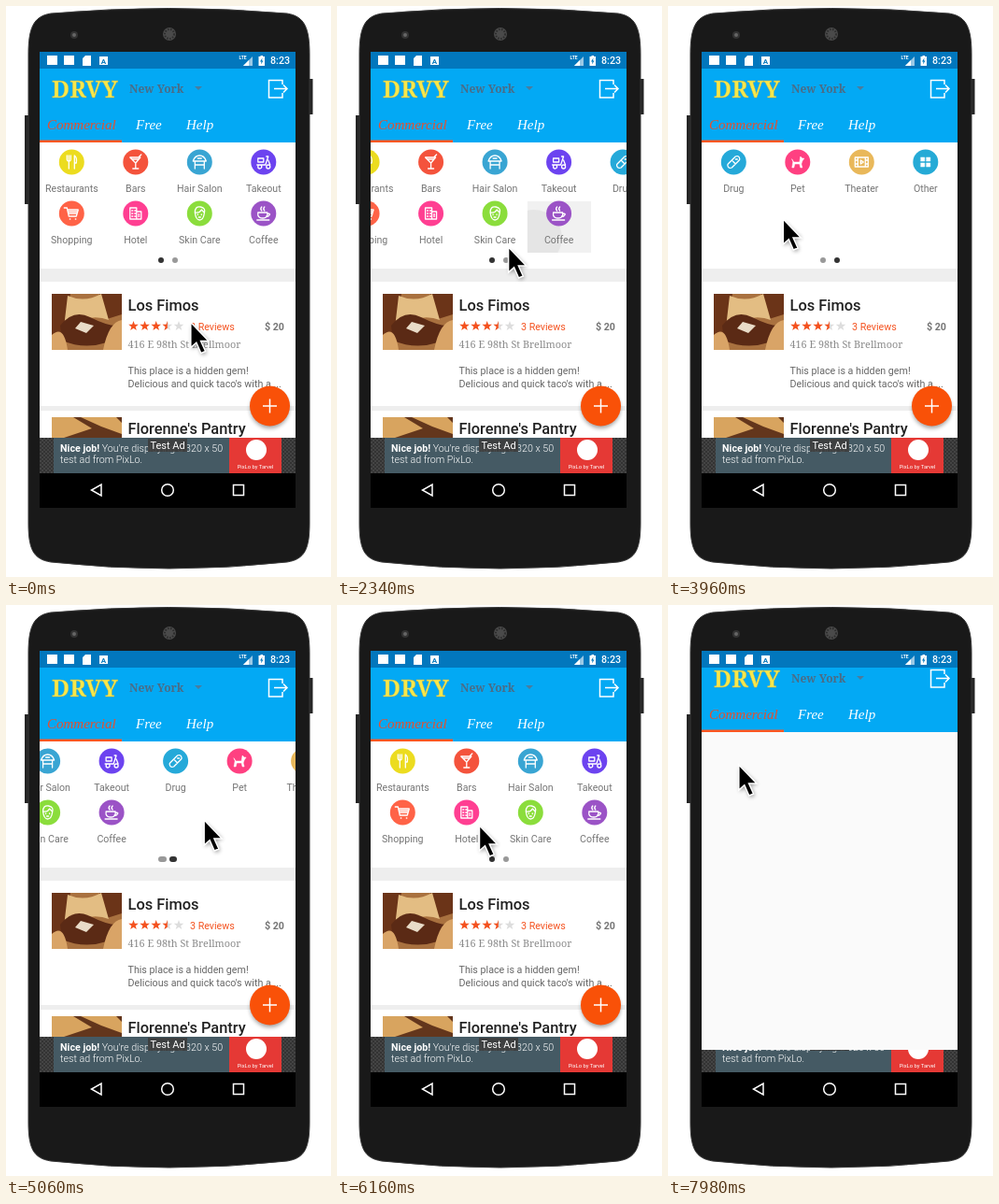
An HTML page that plays this animation: 348 by 611 pixels, repeating every 8000 ms.

```html
<!DOCTYPE html>
<html lang="en">
<head>
<meta charset="utf-8">
<title>Directory app</title>
<style>
html, body { margin: 0; width: 100%; height: 100%; overflow: hidden; background: #fff; }
svg { display: block; width: 100vw; height: 100vh; font-family: Roboto, sans-serif; }
.serif { font-family: "Noto Serif", serif; }
.tab { font: italic 15px "Liberation Serif", serif; fill: #fff; }
.label { font-size: 10.6px; fill: #757575; text-anchor: middle; }
.icon { fill: none; stroke: #fff; stroke-width: 1.3; stroke-linecap: round; stroke-linejoin: round; }
.line { fill: none; stroke: #fff; stroke-width: 1.5; }
.dot { stroke-width: 6; stroke-linecap: round; }
</style>
</head>
<body>
<svg viewBox="0 0 348 611">
  <defs>
    <clipPath id="screen"><rect x="36" y="49" width="274" height="488"/></clipPath>
    <clipPath id="body"><rect x="36" y="67" width="274" height="433"/></clipPath>
    <clipPath id="cell"><rect id="cellBox" width="68.5" height="55"/></clipPath>
    <clipPath id="reveal"><rect id="revealBox"/></clipPath>
    <clipPath id="photo1"><rect x="49" y="308" width="75" height="60"/></clipPath>
    <clipPath id="photo2"><rect x="49" y="440" width="75" height="30"/></clipPath>
    <pattern id="mesh" width="4" height="4" patternUnits="userSpaceOnUse">
      <path d="M0 0H4V4H0Z" fill="#444"/><path d="M0 0H2V2H0ZM2 2H4V4H2Z" fill="#333"/>
    </pattern>
    <filter id="soft" x="-50%" y="-50%" width="200%" height="200%"><feGaussianBlur stdDeviation="2"/></filter>
  </defs>

  <!-- phone -->
  <path d="M22 117V212M326.500 78V116" stroke="#252525" stroke-width="4"/>
  <path d="M24 52C24 24 29 11 48 8Q175-3 301 8C320 11 325 24 325 52V553C325 581 320 592 301 595Q175 609 48 595C29 592 24 581 24 553Z" fill="#191919" stroke="#383838"/>
  <circle cx="73" cy="31" r="4" fill="#333"/><circle cx="73" cy="31" r="2" fill="#666"/>
  <circle cx="175" cy="30" r="7" fill="#4a4a4a"/>
  <circle cx="175" cy="30" r="5" fill="none" stroke="#2c2c2c" stroke-width="2" stroke-dasharray="1.500 1.500"/>

  <g clip-path="url(#screen)">
    <rect x="36" y="49" width="274" height="488" fill="#eee"/>
    <path d="M36 146H310V281H36ZM36 295H310V428H36ZM36 433H310V500H36Z" fill="#fff"/>

    <!-- category pager -->
    <g id="pager">
      <g id="ripple" clip-path="url(#cell)">
        <rect id="rippleBg" width="68.5" height="55" fill="#000" opacity=".055"/>
        <circle id="rippleDot" fill="#000" opacity=".05"/>
      </g>
    </g>
    <path id="gray" class="dot" stroke="#999"/>
    <path id="dark" class="dot" stroke="#333"/>

    <!-- first listing -->
    <g clip-path="url(#photo1)">
      <path d="M49 308h75v60h-75Z" fill="#a9713f"/>
      <path d="M49 308h20l-12 60h-8ZM100 308h24v22l-16 5Z" fill="#6b3418"/>
      <path d="M66 310Q84 318 102 308L110 336Q90 328 62 344Z" fill="#e3bd83"/>
      <path d="M58 342Q72 324 90 333T118 342L108 360Q84 368 60 358Z" fill="#5b2a15"/>
      <path d="M49 352Q62 340 66 368H49ZM104 368Q110 338 124 336V368Z" fill="#d9a467"/>
      <path d="M80 338l14 4-8 8-12-5Z" fill="#e9dcc8"/>
    </g>
    <text x="130.500" y="326" font-size="16.400" font-weight="500" fill="#212121">Los Fimos</text>
    <g id="stars"></g>
    <text x="197" y="346.500" font-size="10.700" fill="#f4511e">3 Reviews</text>
    <text x="298" y="346.500" font-size="10.700" font-weight="700" fill="#757575" text-anchor="end">$ 20</text>
    <text x="130.500" y="366" class="serif" font-size="10.800" fill="#8a8a8a">416 E 98th St Brellmoor</text>
    <g font-size="10.700" fill="#666">
      <text x="130.500" y="394">This place is a hidden gem!</text>
      <text x="130.500" y="408">Delicious and quick taco's with a ...</text>
    </g>

    <!-- second listing -->
    <g clip-path="url(#photo2)">
      <path d="M49 440h75v30h-75Z" fill="#63361c"/>
      <path d="M49 440H72L92 452 62 462H49ZM80 440H118L124 446V458L102 450Z" fill="#d8a45f"/>
    </g>
    <text x="130.500" y="458" font-size="16.400" font-weight="500" fill="#212121">Florenne's Pantry</text>

    <!-- advert -->
    <path d="M36 462H310V500H36Z" fill="url(#mesh)"/>
    <path d="M51 462H239V500H51Z" fill="#455a64"/>
    <path d="M239 462H295V500H239Z" fill="#e53935"/>
    <circle cx="268" cy="475" r="11" fill="#fff"/>
    <text x="267" y="495" font-size="5.800" fill="#fff" text-anchor="middle">PixLo by Tarvel</text>
    <g font-size="10.700" fill="#fff" font-weight="300">
      <text x="58" y="477"><tspan font-weight="700">Nice job!</tspan> You're displaying a 320 x 50</text>
      <text x="58" y="489">test ad from PixLo.</text>
    </g>
    <path d="M152 463H194V477H152Z" fill="#3c3c3c" opacity=".9"/>
    <text x="173" y="474" font-size="11" fill="#fff" text-anchor="middle">Test Ad</text>

    <!-- add button -->
    <circle cx="282.500" cy="431" r="21" opacity=".35" filter="url(#soft)"/>
    <circle cx="282.500" cy="428" r="21.500" fill="#f95108"/>
    <path d="M275 428H290M282.500 420.500V435.500" class="line" stroke-width="1.300"/>

    <!-- header -->
    <g clip-path="url(#body)">
      <g id="header">
        <path d="M36 67H310V146H36Z" fill="#03a9f4"/>
        <text x="49" y="98" class="serif" font-size="25" font-weight="700" fill="#f6e84b" stroke="#c9b04a" stroke-width=".4">DRVY</text>
        <text x="132" y="93" class="serif" font-size="12" font-weight="700" fill="#4b6c86">New York</text>
        <path d="M202 86H210L206 90Z" fill="#4b7c9c"/>
        <path d="M296 84V79.500H281.500V98H296V93M287 88.500H301M297 84.500L301 88.500 297 92.500" class="line" stroke-width="1.300"/>
        <text x="44" y="132" class="tab" style="fill:#e5502f">Commercial</text>
        <text x="139" y="132" class="tab">Free</text>
        <text x="193" y="132" class="tab">Help</text>
        <path d="M36 143.500H124V146H36Z" fill="#ff5722"/>
      </g>
    </g>

    <!-- opening screen -->
    <g id="next" clip-path="url(#reveal)">
      <path d="M36 67H310V500H36Z" fill="#fafafa"/>
      <use id="nextHeader" href="#header"/>
    </g>

    <!-- status bar -->
    <path d="M36 49H310V67H36Z" fill="#0277bd"/>
    <path d="M44 53H55V63H44ZM62 53H73V63H62ZM85 53H91V64H82V56ZM100 54H109V63H100Z" fill="#fff"/>
    <text x="104.500" y="61.500" font-size="8" font-weight="700" fill="#0277bd" text-anchor="middle">A</text>
    <text x="249.500" y="57" font-size="5" font-weight="700" fill="#fff">LTE</text>
    <path d="M264 54V64H254Z" fill="#fff" opacity=".6"/><path d="M260 58V64H254Z" fill="#fff"/>
    <path d="M270.500 54H272.500V53H275V54H277V64H270.500Z" fill="#fff"/>
    <path d="M274.500 55.500L272 59.500H273.500L273 62.500 275.500 58.500H274Z" fill="#0277bd"/>
    <text x="283" y="62" font-size="10.700" font-weight="500" fill="#fff">8:23</text>

    <!-- navigation bar -->
    <path d="M36 500H310V537H36Z"/>
    <path d="M102 512V524L91.500 518ZM243.500 512.500H254.500V523.500H243.500Z" class="line"/>
    <circle cx="173" cy="518" r="6.300" class="line"/>
  </g>

  <g id="cursor">
    <path d="M2 4V30L8 25 13 36 18 34 13 23 21 22Z" opacity=".4" filter="url(#soft)"/>
    <path d="M.800 1V28L6.800 22.800 11.800 34 16.600 32 11.600 21H20Z" fill="#000" stroke="#fff" stroke-width="1.500"/>
  </g>
</svg>

<script>
const $ = id => document.getElementById(id);
const set = (el, attrs) => { for (const k in attrs) el.setAttribute(k, attrs[k]); };
const clamp = v => Math.min(1, Math.max(0, v));
const ramp = (t, a, b) => clamp((t - a) / (b - a));
const mix = (a, b, k) => a + (b - a) * k;

// Icons are drawn around (0, 0)
const categories = [
  ["Restaurants", "#ecdc1f", "M-3 7V-7M-5-7V-3Q-5-1-3-1T-1-3V-7M3 7V-7Q6-5 5 1H3"],
  ["Bars", "#f4533c", "M-6-5H5L0 1ZM0 1V7M-3 7H3M3-5L6-8M-4-3H3"],
  ["Hair Salon", "#39a5d3", "M-7-1Q-5-7 0-7T7-1ZM-5-1V7M5-1V7M-5 3H5M-2-4H2"],
  ["Takeout", "#6c43f0", "M-7 3H2L5-6H3M-6 0H0V-4H-6ZM5-2L7 3M-6 5A2 2 0 1 0-2 5A2 2 0 1 0-6 5M3 5A2 2 0 1 0 7 5A2 2 0 1 0 3 5"],
  ["Shopping", "#ff6347", "M-8-6H-5L-3 3H5L7-4H-4M-4-2H6M-3 0H5M-2 6H-1.5M4 6H4.5"],
  ["Hotel", "#ff3f92", "M-6 6V-6H1V6M1-2H6V6H-6M-4-3H-3M-1-3H0M-4 0H-3M-1 0H0M-4 3H-3M-1 3H0M3 1H4M3 3H4"],
  ["Skin Care", "#8bdd3c", "M-5-1Q-5-8 1-7T5 0Q4 7 0 7T-5-1Q0 0 2-4L5-1M-2 1V1.500M2 1V1.500M-1 4H1"],
  ["Coffee", "#9b53c6", "M-6-1H4V2Q3 5-1 5T-6 2ZM4 0Q8 0 6 2T3 3M-7 7H6M-2-3Q-4-5-2-7M1-3Q-1-5 1-7"],
  ["Drug", "#25a9d9", "M-6 2L2-6Q5-7 6-5T6-2L-2 6Q-5 7-6 5T-6 2M-2-2L2 2M2-3L4-3"],
  ["Pet", "#ff4081", "M-6-3L-4 0H2L3-6 5-4H7L5-1 4 2 5 6H3L2 2H-3L-4 6H-6L-5 0Z", 1],
  ["Theater", "#e9b85a", "M-7-5H7V5H-7ZM-4-5V5M4-5V5M-7-2H-4M-7 2H-4M4-2H7M4 2H7M-1-2L2 0-1 2Z"],
  ["Other", "#25aad6", "M-5-5H-1V-1H-5ZM1-5H5V-1H1ZM-5 1H-1V5H-5ZM1 1H5V5H1Z", 1]
];
$("pager").insertAdjacentHTML("afterbegin", categories.map(([name, color, path, solid], i) => {
  const x = 70.3 + 68.5 * (i % 4) + (i > 7 ? 274 : 0);
  const y = i > 3 && i < 8 ? 222 : 167;
  return `<g transform="translate(${x} ${y})"><circle r="13.5" fill="${color}"/>
    <path class="icon" d="${path}" ${solid ? 'style="fill:#fff;stroke-width:.5"' : ""}/>
    <text class="label" y="32">${name}</text></g>`;
}).join(""));
$("pager").insertAdjacentElement("afterbegin", $("ripple"));
$("pager").outerHTML = `<g clip-path="url(#body)">${$("pager").outerHTML}</g>`;

const star = Array.from({ length: 10 }, (_, i) => {
  const r = i % 2 ? 2.3 : 5.6, a = Math.PI * (i / 5 - .5);
  return [r * Math.cos(a), r * Math.sin(a)].map(v => v.toFixed(2));
});
const half = star.slice(5).concat([star[0]]);
$("stars").innerHTML = [136.5, 148.6, 160.7, 172.8, 185].map((x, i) => {
  const poly = (points, fill) => `<polygon points="${points.join(" ")}" fill="${fill}"/>`;
  return `<g transform="translate(${x} 342.5)">${poly(star, i < 3 ? "#f4511e" : "#ddd")}${i == 3 ? poly(half, "#f4511e") : ""}</g>`;
}).join("");

// Monotone cubic through rows of [time, ...values]
function track(rows, t) {
  const last = rows.length - 1;
  if (t <= rows[0][0]) return rows[0].slice(1);
  if (t >= rows[last][0]) return rows[last].slice(1);
  const i = rows.findIndex(r => r[0] > t) - 1, a = rows[i], b = rows[i + 1];
  const h = b[0] - a[0], u = (t - a[0]) / h;
  const rate = (j, c) => (rows[j + 1][c] - rows[j][c]) / (rows[j + 1][0] - rows[j][0]);
  const slope = (j, c) => {
    if (j == 0 || j == last) return 0;
    const p = rate(j - 1, c), q = rate(j, c);
    return p * q > 0 ? 2 * p * q / (p + q) : 0;
  };
  return a.slice(1).map((v, k) => {
    const c = k + 1, w = 1 - u;
    return v * (1 + 2 * u) * w * w + b[c] * u * u * (3 - 2 * u)
      + h * (slope(i, c) * u * w * w - slope(i + 1, c) * u * u * w);
  });
}

const pointer = [
  [40, 197, 337.5], [860, 196, 335.5], [1050, 192, 325], [1350, 215, 275],
  [1660, 248, 247], [1720, 249.5, 248.5], [2100, 249.5, 248.5], [2340, 183, 257],
  [2650, 118, 275], [2900, 96, 281], [3580, 96, 281], [3800, 118, 240],
  [3960, 122.5, 227], [4150, 110, 225], [4380, 80, 227], [4440, 77, 228],
  [4680, 77, 228], [5060, 211, 229], [5350, 300, 236], [5480, 316, 238],
  [5800, 262, 247], [6160, 152, 235], [6320, 101, 219], [6600, 74, 185],
  [6800, 71, 172], [7040, 75, 170]
];
const swipe = [
  [2160, 0], [2340, -38], [2700, -120], [2900, -205], [3000, -243], [3200, -270], [3380, -274],
  [4740, -274], [5060, -163], [5350, -85], [5480, -60], [5650, -20], [5900, 0]
];
// Left and right ends of the dark dot, then of the gray one
const dots = [
  [2700, 166, 166, 181, 181], [3000, 166, 166, 168, 180], [3200, 176, 181, 166, 170],
  [3380, 181, 181, 166, 166], [4800, 181, 181, 166, 166], [5060, 178, 180, 166, 169],
  [5350, 168, 172, 175, 180], [5600, 166, 166, 181, 181]
];

function drawRipple(t) {
  const tap = t > 7000;
  const [x, y, cx, cy] = tap ? [36, 154, 75, 170] : [242, 209, 249, 248];
  const start = tap ? 7740 : 2120;
  const alpha = ramp(t, start, start + 80) * (tap ? 1 : 1 - ramp(t, 2450, 2650));
  set($("cellBox"), { x, y });
  set($("rippleBg"), { x, y });
  set($("rippleDot"), { cx, cy, r: 8 + 40 * ramp(t, start, start + 400) });
  set($("ripple"), { opacity: alpha });
}

function draw(t) {
  const [x, y] = track(pointer, t);
  set($("cursor"), { transform: `translate(${x} ${y})` });
  set($("pager"), { transform: `translate(${track(swipe, t)[0]} 0)` });
  const [dl, dr, gl, gr] = track(dots, t);
  set($("dark"), { d: `M${dl} 272H${dr + .01}` });
  set($("gray"), { d: `M${gl} 272H${gr + .01}` });
  drawRipple(t);

  const k = .9 * (1 - (1 - ramp(t, 7760, 7980)) ** 2);
  const top = mix(150, 67, clamp(k * 1.5));
  set($("revealBox"), { x: 36, y: top, width: 274, height: mix(260, 500, k) - top });
  set($("next"), { opacity: ramp(t, 7760, 7850) });
  set($("nextHeader"), { transform: `translate(0 ${mix(-100, 0, k)})` });
}

const begin = performance.now();
(function loop() {
  draw((performance.now() - begin) % 8000);
  requestAnimationFrame(loop);
})();
</script>
</body>
</html>
```
